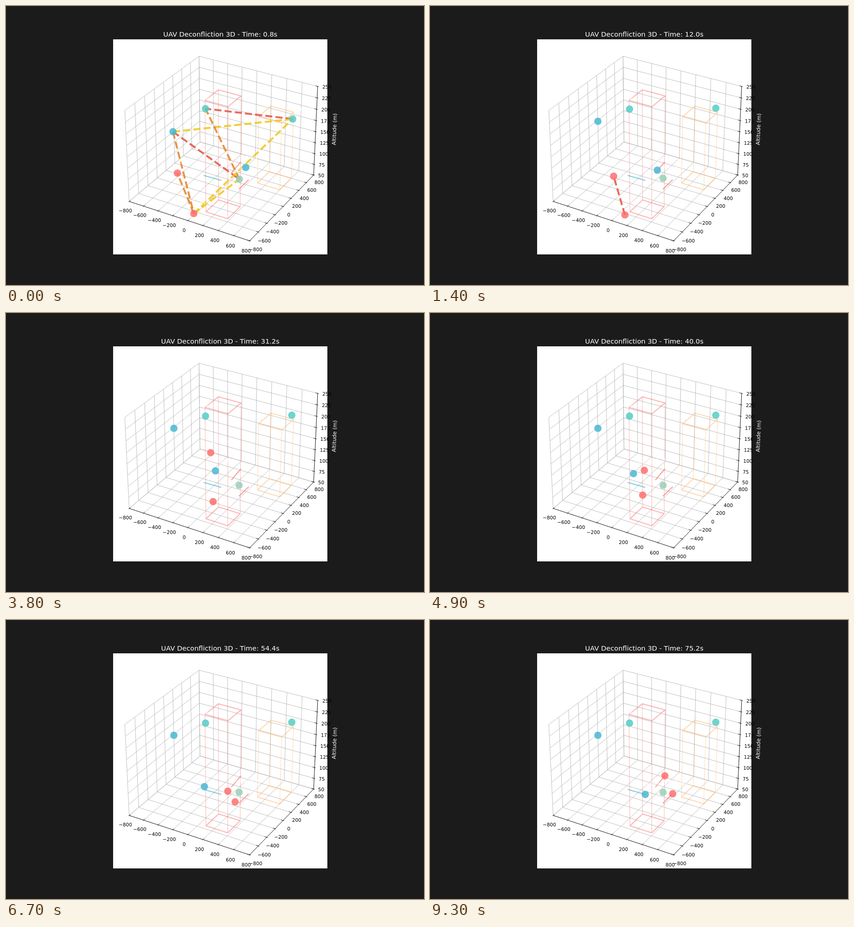
Write an HTML page that moves like this. It is 917 px wide and 611 px high and loops after 9400 ms.

```html
<!DOCTYPE html>
<html lang="en">
<head>
<meta charset="utf-8">
<title>UAV Deconfliction 3D</title>
<style>
html, body { margin: 0; width: 100%; height: 100%; overflow: hidden; background: #1b1b1b; }
svg { display: block; width: 917px; height: 611px; }
text { font-family: "DejaVu Sans", sans-serif; }
</style>
</head>
<body>
<svg id="stage" viewBox="0 0 917 611" xmlns="http://www.w3.org/2000/svg"></svg>
<script>
const NS = 'http://www.w3.org/2000/svg';
const stage = document.getElementById('stage');

function add(tag, attrs, text) {
  const el = document.createElementNS(NS, tag);
  set(el, attrs);
  if (text !== undefined) el.textContent = text;
  stage.appendChild(el);
  return el;
}
function set(el, attrs) {
  for (const k in attrs) el.setAttribute(k, attrs[k]);
}

// Perspective camera: elevation 30, azimuth -60, distance 10
const SCALE = 2543.1, CX = 476.3, CY = 302.4;
const SIN = 0.5, COS = Math.sqrt(3) / 2;
function project(x, y, z) {
  const a = x / 800 * 0.59524, b = y / 800 * 0.59524, c = (z - 150) / 100 * 0.44643;
  const depth = COS * SIN * a - COS * COS * b + SIN * c;
  const k = SCALE / (10 - depth);
  return [CX + (COS * a + SIN * b) * k, CY + (SIN * SIN * a - SIN * COS * b - COS * c) * k];
}

const path = (pts, attrs) => add('path', { d: 'M' + pts.map(p => p.map(n => n.toFixed(2)).join()).join('L'), fill: 'none', ...attrs });
const path3 = (pts, attrs) => path(pts.map(p => project(...p)), attrs);
const label = (x, y, s) => add('text', { x, y: y + 3.9, 'font-size': 10.61, 'text-anchor': 'middle' }, s);
const num = n => String(n).replace('-', '\u2212');

add('rect', { x: 235, y: 73, width: 470, height: 471, fill: '#fff' });

// Grid, axes and ticks
const grid = { stroke: '#b0b0b0', 'stroke-width': 0.85, 'stroke-linejoin': 'round' };
const axis = { stroke: '#000', 'stroke-width': 0.85 };
const ticks = Array.from({ length: 9 }, (_, i) => ({ h: -800 + 200 * i, z: 50 + 25 * i, f: i / 8 }));

for (const { h } of ticks) path3([[h, -800, 50], [h, 800, 50], [h, 800, 250]], grid);
for (const { h } of ticks) path3([[800, h, 50], [-800, h, 50], [-800, h, 250]], grid);
for (const { z } of ticks) path3([[800, 800, z], [-800, 800, z], [-800, -800, z]], grid);

path3([[-800, -800, 50], [800, -800, 50], [800, 800, 50], [800, 800, 250]], axis);

for (const { h, z, f } of ticks) {
  path3([[h, -813, 50], [h, -773, 50]], axis);
  path3([[813, h, 50], [773, h, 50]], axis);
  path3([[813, 800, z], [773, 800, z]], axis);
  const px = project(h, -800, 50), py = project(800, h, 50), pz = project(800, 800, z);
  label(px[0] - 8.3 + 0.8 * f, px[1] + 20 + 2 * f, num(h));
  label(py[0] + 13.2 - 1.2 * f, py[1] + 19.2 - 3 * f, num(h));
  label(pz[0] + (z < 100 ? 16.7 : 20.4), pz[1] + 0.8, num(z));
}
add('text', { transform: 'translate(724.5 270) rotate(-88)', 'font-size': 11.67, 'text-anchor': 'middle', fill: '#fff' }, 'Altitude (m)');

// Restricted volumes: square of side 300 around (mid, mid)
function volume(mid, low, high, stroke) {
  const ring = z => [[-1, -1], [-1, 1], [1, 1], [1, -1]].map(([x, y]) => [mid + 150 * x, mid + 150 * y, z]);
  const look = { stroke, 'stroke-opacity': 0.5, 'stroke-linejoin': 'round' };
  const base = ring(low), top = ring(high);
  for (const r of [base, top]) path3([...r, r[0]], { ...look, 'stroke-width': 2.1 });
  base.forEach((p, i) => path3([p, top[i]], { ...look, 'stroke-width': 1.06 }));
}
volume(0, 0, 250, '#ff6b6b');
volume(450, 50, 200, '#ffb366');

// Way points are [seconds, x, y]; lift is the evasive climb on top of the route
const RED = '#ff6b6b', BLUE = '#45b7d1', TEAL = '#4ecdc4', GREEN = '#96ceb4';
const FIRST = 1.5, SECOND = 13.3;
const phases = (a, b, c) => t => t < FIRST ? a : t < SECOND ? b : c;
const hop = t => 117 * Math.max(0, Math.min((t - 14) / 7, (52 - t) / 31));
const drone = (color, route, lift = () => 0) => ({ color, route, lift });
const hover = (color, x, y, dx, dy) => drone(color, [[0.8, x, y], [FIRST, x + dx, y + dy]]);

const drones = {
  a: drone(RED, [[0.8, 376, 366], [52, 499, 397], [60, 511, 401.3], [75, 532.4, 380.5]], hop),
  b: drone(RED, [[0.8, 412, 463], [75, 515.3, 341.2]], phases(8.5, -13, 0)),
  c: drone(BLUE, [[0.8, 526, 353.7], [23.2, 471.3, 340.3], [46, 437.5, 356], [60, 433.7, 371], [75, 472.3, 382]], phases(0, -12.5, 0)),
  d: hover(BLUE, 366.3, 275.3, 2, -22.8),
  e: hover(TEAL, 437.7, 224.8, 0, 1),
  f: hover(TEAL, 629, 247.5, -2, -23.7),
  g: hover(GREEN, 512, 379.3, -0.6, -2)
};
const fleet = Object.values(drones);

function along(route, t) {
  const i = route.findIndex(p => p[0] >= t);
  if (i <= 0) return route.at(i).slice(1);
  const [t0, x0, y0] = route[i - 1], [t1, x1, y1] = route[i];
  const f = (t - t0) / (t1 - t0);
  return [x0 + (x1 - x0) * f, y0 + (y1 - y0) * f];
}

// Last leg of each moving drone
for (const { route, color } of [drones.a, drones.b, drones.c])
  path([along(route, 60), along(route, 75)], { stroke: color, 'stroke-width': 2.1, 'stroke-opacity': 0.7 });

// Conflict links: a whole set at the first step, then one pair until it is resolved
const HIGH = '#e74c3c', MID = '#e67e22', LOW = '#f1c40f';
const link = (pair, stroke, first = 0, last = 0) => ({
  ends: [...pair].map(k => drones[k]), first, last,
  el: add('line', { stroke, 'stroke-width': 4.24, 'stroke-opacity': 0.82, 'stroke-dasharray': '15.7 6.8' })
});
const links = [
  link('fe', HIGH), link('dg', HIGH), link('df', LOW), link('ge', MID),
  link('bf', LOW), link('ba', MID), link('db', MID), link('bg', LOW),
  link('ba', HIGH, 1, 15)
];

fleet.forEach((d, i) => {
  d.tag = add('text', { 'font-size': 8.5, fill: '#fff', 'fill-opacity': 0.85 }, 'Aircraft_0' + (i + 1));
});
for (const d of fleet) d.dot = add('circle', { r: 8, fill: d.color, 'fill-opacity': 0.83 });
const title = add('text', { x: 470.2, y: 67, 'font-size': 14.86, 'text-anchor': 'middle', fill: '#fff' }, '');

let shown = -1;
function draw(ms) {
  const step = Math.floor(ms % 9400 / 100);
  if (step === shown) return;
  shown = step;
  const t = 0.8 * (step + 1);
  title.textContent = 'UAV Deconfliction 3D - Time: ' + t.toFixed(1) + 's';
  for (const d of fleet) {
    const [x, y] = along(d.route, t);
    d.x = x;
    d.y = y - d.lift(t);
    set(d.dot, { cx: d.x, cy: d.y });
    set(d.tag, { x: d.x + 1, y: d.y - 20 });
  }
  for (const { ends: [p, q], first, last, el } of links) {
    const visibility = step >= first && step <= last ? 'visible' : 'hidden';
    set(el, { visibility, x1: p.x, y1: p.y, x2: q.x, y2: q.y });
  }
}

const start = performance.now();
function tick() {
  draw(performance.now() - start);
  requestAnimationFrame(tick);
}
tick();
</script>
</body>
</html>
```
